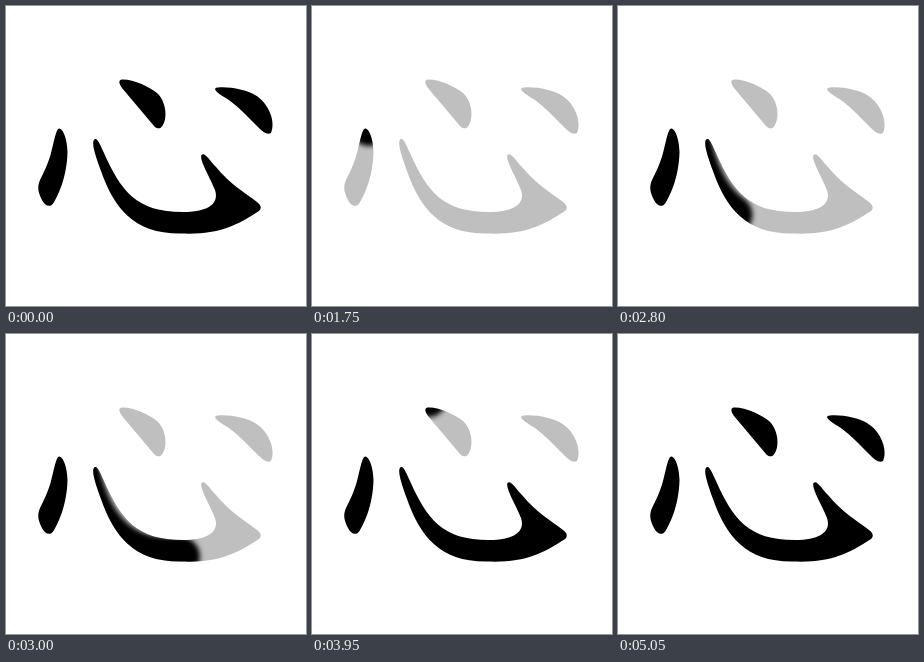
An HTML page that plays this animation: 300x300 px, repeating every 6050 ms.

```html
<!DOCTYPE html>
<html lang="en">
<head>
<meta charset="utf-8">
<title>Stroke order</title>
<style>
html, body { margin: 0; width: 100%; height: 100%; overflow: hidden; background: #fff; }
svg { display: block; width: 100%; height: 100%; }
.brush { fill: none; stroke: #000; stroke-width: 40; stroke-linecap: round; stroke-linejoin: round; filter: url(#soft); }
</style>
</head>
<body>
<svg id="stage" viewBox="0 0 300 300">
  <filter id="soft" filterUnits="userSpaceOnUse" x="0" y="0" width="300" height="300" color-interpolation-filters="sRGB">
    <feGaussianBlur stdDeviation="2.5"/>
  </filter>
</svg>
<script>
const LOOP = 6050, GREY_FROM = 1000, STEP = 100;
const stage = document.getElementById('stage');

// A soft round brush follows each route in equal steps, showing only inside the outline.
const strokes = [
  {
    outline: 'M53 122.5C57 122 61.5 134 61.5 146C61 170 53 188 47.5 197C44 202 39 200 36 194C32 186 31 181 34 174C38 166 42 158 45 147C48 136 50 123 53 122.5Z',
    moves: [
      { start: 1750, steps: 1, route: 'M58 100L57 120' },
      { start: 1900, steps: 3, route: 'M57 120L38 190' }
    ]
  },
  {
    outline: 'M89 133C92 132 95 141 98 147C115 185 130 206 177 206C205 206 213 196 209 184C204 171 193 154 195.5 149C199 146 203 154 210 161C224 178 238 186 251 196C255 199 256 202 253 205C230 220 212 229 175 227.5C128 228 108 202 95 165C88 146 85 135 89 133Z',
    moves: [
      { start: 2600, steps: 7, route: 'M72 128Q90 225 165 223Q205 222 235 212' },
      { start: 3350, steps: 2, route: 'M235 212L200 150' }
    ]
  },
  {
    outline: 'M116 73.5C127 73 144 81 151 87C161 96 162 115 155 121.5C153 123 150 122.5 148 120L116 82C112 76 113 74 116 73.5Z',
    moves: [{ start: 3950, steps: 4, route: 'M104 44L152 120' }]
  },
  {
    outline: 'M212 81.5C225 80.5 240 84 249 89C263 97 270 116 265 127C261 129 257 126 253 122C241 110 229 97 218 91C210 86 206 82 212 81.5Z',
    moves: [{ start: 4750, steps: 4, route: 'M187 66L262 122' }]
  }
];

function add(parent, tag, attributes) {
  const node = document.createElementNS(stage.namespaceURI, tag);
  for (const name in attributes) node.setAttribute(name, attributes[name]);
  return parent.appendChild(node);
}

strokes.forEach((stroke, i) => {
  const clip = add(stage, 'clipPath', { id: 'clip' + i });
  add(clip, 'path', { d: stroke.outline });
  stroke.shape = add(stage, 'path', { d: stroke.outline });
  stroke.ink = add(stage, 'g', { 'clip-path': `url(#clip${i})` });
  for (const move of stroke.moves) {
    move.brush = add(stroke.ink, 'path', { d: move.route, pathLength: 1, class: 'brush' });
  }
  const last = stroke.moves[stroke.moves.length - 1];
  stroke.done = last.start + (last.steps - 1) * STEP;
});

function drawStroke({ shape, ink, moves, done }, time) {
  const solid = time < GREY_FROM || time >= done;
  shape.setAttribute('fill', solid ? '#000' : '#bfbfbf');
  ink.style.display = solid ? 'none' : '';
  for (const { brush, start, steps } of moves) {
    const step = Math.floor((time - start) / STEP) + 1;
    brush.style.display = step > 0 ? '' : 'none';
    brush.setAttribute('stroke-dasharray', `${Math.min(1, Math.max(0, step / steps))} 2`);
  }
}

const begin = performance.now();
function render() {
  const time = (performance.now() - begin) % LOOP;
  for (const stroke of strokes) drawStroke(stroke, time);
  requestAnimationFrame(render);
}
render();
</script>
</body>
</html>
```
